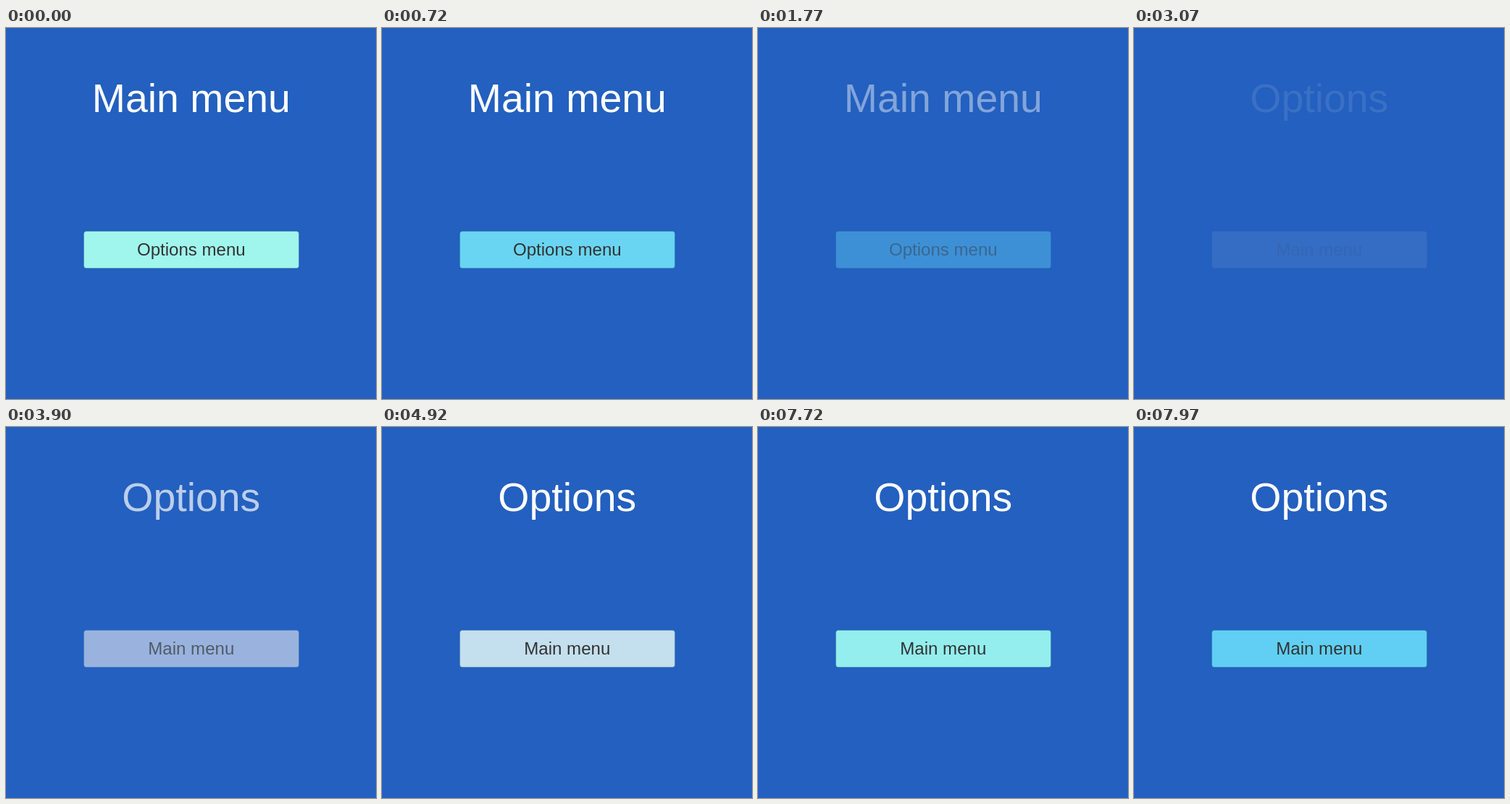
Recreate the animation shown at these times as an HTML page with a canvas. Size 511 by 512 pixels, loop 8 s.

```html
<!DOCTYPE html>
<html>
<head>
<meta charset="utf-8">
<title>Menu transition</title>
<style>
html, body { margin: 0; width: 100%; height: 100%; overflow: hidden; background: #2360bf; }
canvas { display: block; }
</style>
</head>
<body>
<canvas id="stage" width="511" height="512"></canvas>
<script>
const ctx = document.getElementById('stage').getContext('2d');
const LOOP = 8000;
const IDLE = [205, 217, 237], HOVER = [160, 246, 236], PRESSED = [96, 207, 243];

const progress = (t, from, to) => Math.min(1, Math.max(0, (t - from) / (to - from)));
const smooth = u => u * u * (3 - 2 * u);
const mix = (a, b, u) => a.map((v, i) => v + (b[i] - v) * u);
const rgb = c => `rgb(${c.map(Math.round).join(',')})`;

function drawText(text, size, y, color) {
  ctx.font = `${size}px "Liberation Sans", Arial, sans-serif`;
  ctx.fillStyle = color;
  ctx.fillText(text, 255.8, y);
}

function drawButton(label, color) {
  ctx.fillStyle = rgb(color);
  ctx.beginPath();
  ctx.roundRect(107.5, 280.4, 297, 51.2, 3.5);
  ctx.fill();
  ctx.strokeStyle = 'rgba(30, 80, 120, 0.25)';
  ctx.stroke();
  drawText(label, 24.05, 314.4, '#323232');
}

function drawMenu(title, label, buttonColor, alpha) {
  ctx.globalAlpha = alpha;
  drawText(title, 55.4, 115.9, '#fff');
  drawButton(label, buttonColor);
  ctx.globalAlpha = 1;
}

function draw(t) {
  ctx.fillStyle = '#2360bf';
  ctx.fillRect(0, 0, 511, 512);

  const mainColor = mix(HOVER, PRESSED, progress(t, 490, 760));
  drawMenu('Main menu', 'Options menu', mainColor, 1 - smooth(progress(t, 720, 2650)));

  const hovered = mix(IDLE, HOVER, progress(t, 4750, 5560));
  const optionsColor = mix(hovered, PRESSED, progress(t, 7655, 7970));
  drawMenu('Options', 'Main menu', optionsColor, smooth(progress(t, 2680, 4610)));
}

ctx.textAlign = 'center';
const start = performance.now();
function tick() {
  draw((performance.now() - start) % LOOP);
  requestAnimationFrame(tick);
}
tick();
</script>
</body>
</html>
```
